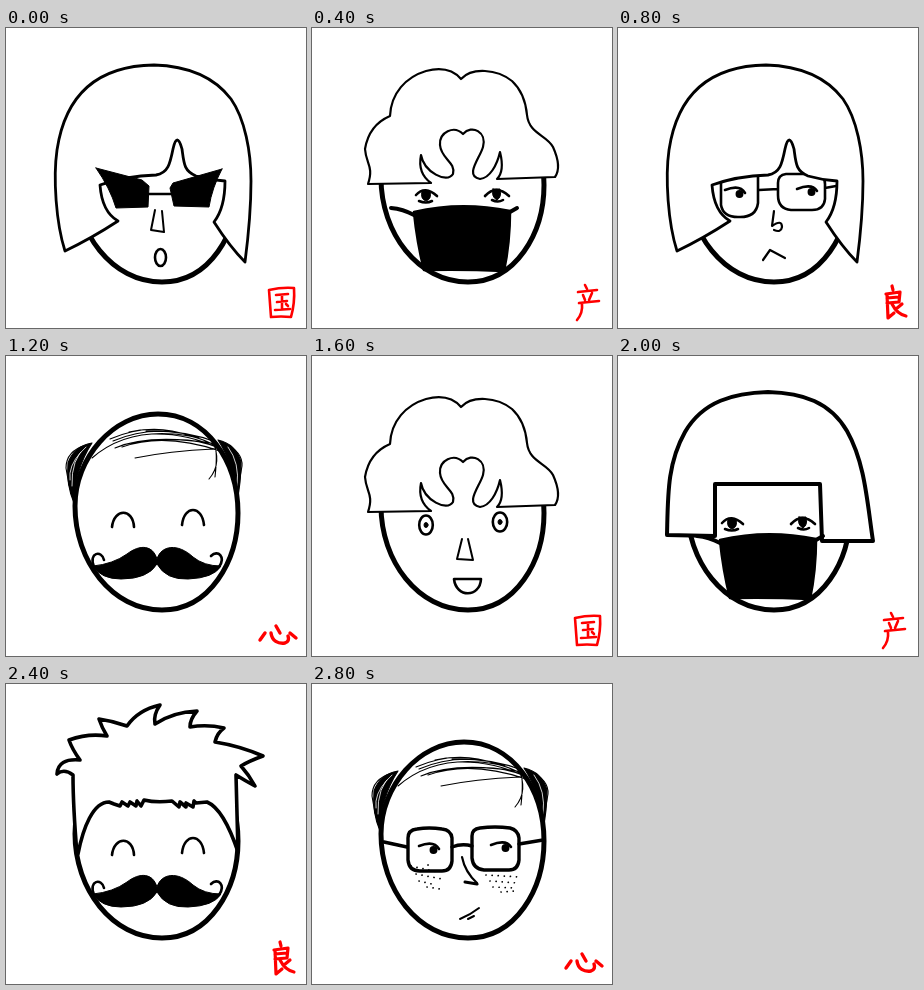
Write an HTML page that moves like this. It is 300 px wide and 300 px high and loops after 3.2 s.

```html
<!DOCTYPE html>
<html lang="zh">
<head>
<meta charset="utf-8">
<title>国产良心</title>
<style>
  html, body { margin: 0; width: 100%; height: 100%; overflow: hidden; background: #fff; }
  svg { display: block; width: 100vw; height: 100vh; }
  .ink { fill: none; stroke: #000; stroke-width: 2.6; stroke-linecap: round; stroke-linejoin: round; }
  .hair { fill: #fff; }
  .solid { fill: #000; }
  .thin { stroke-width: 1.1; }
  .bold { stroke-width: 4; }
  .dots { stroke-width: 1.7; stroke-dasharray: .1 6; }
  .seal { fill: none; stroke: #f00; stroke-width: 2.6; stroke-linecap: round; stroke-linejoin: round; }
  .pose { visibility: hidden; animation: show 3.2s step-end infinite; animation-delay: calc(var(--i) * .4s - 3.2s); }
  @keyframes show { 0% { visibility: visible; } 12.5%, 100% { visibility: hidden; } }
</style>
</head>
<body>
<svg viewBox="0 0 300 300">
  <defs>
    <path id="head" stroke-width="5" d="M152 58C107 58 69 102 69 150C69 205 106 254 156 254C204 254 232 205 232 157C232 105 200 58 152 58Z"/>

    <!-- Hair -->
    <path id="bob" class="hair" stroke-width="2.8" d="M59 223C50 195 47 150 51 122C57 82 78 38 148 37C183 38 209 50 225 71C239 91 245 124 245 153C245 184 242 211 239 234Q224 219 208 194C215 185 219 171 219 153Q204 152 190 148C178 143 178 136 176 121Q171 103 167 121C164 136 162 145 150 147Q119 148 94 157Q96 184 112 193Q86 210 59 223Z"/>
    <path id="curls" class="hair" stroke-width="2.2" d="M56 156C62 138 54 136 53 121Q57 97 78 88C79 65 94 49 114 43Q137 37 149 51C160 39 185 41 200 53Q213 65 215 87C217 106 235 107 241 119Q250 139 243 149L185 151C192 144 190 132 188 124C185 137 178 150 168 151C152 148 168 130 171 119C175 104 160 96 151 106C142 97 127 104 128 117C129 131 144 134 141 146C135 156 112 144 109 127C106 142 112 150 119 155Z"/>
    <path id="bowl" class="hair bold" d="M49 179C50 140 49 108 67 76C85 45 116 37 150 36C185 37 212 46 229 75C247 107 249 145 255 185L204 185L202 128L97 128L97 180Z"/>
    <path id="spikes" class="hair" stroke-width="3.6" d="M71 170Q67 122 67 91Q58 84 51 90Q52 74 74 76Q66 65 63 56Q82 49 101 52Q96 44 93 35Q107 37 121 42Q132 26 154 21Q147 31 149 40Q167 28 191 27Q184 35 184 43Q201 40 218 44Q211 49 209 58Q234 62 257 72Q243 77 235 82Q243 91 249 102Q238 96 230 91L232 168C224 144 213 123 201 118L190 119L188 117L187 123L180 119V123L174 118L173 123L166 117Q150 119 138 116L135 122L131 117L130 122L124 118L122 122L116 118L114 122L108 120L103 118C87 118 77 144 72 170"/>
    <g id="combover" class="thin">
      <path class="solid" d="M86 87Q68 90 62 107Q60 128 68 147Q69 113 86 87ZM212 84Q230 88 235 106Q235 127 231 145Q228 108 212 84Z"/>
      <path stroke="#fff" stroke-width=".8" d="M80 91Q65 102 66 130M75 96Q62 110 64 124M222 91Q234 107 231 130"/>
      <path d="M80 89Q60 95 60 112Q62 128 67 143M218 87Q237 96 236 110L230 144"/>
      <path d="M86 102Q118 74 168 78Q197 80 214 93M104 83Q145 65 184 80Q197 83 208 89M109 92Q144 77 211 88M116 91Q158 76 214 95M129 102Q163 95 208 93M107 85Q139 71 176 77M123 76Q154 69 193 82M150 78Q183 78 212 92M140 75Q178 74 210 86M160 84Q190 82 213 92M206 84Q217 107 203 123M208 87Q212 95 209 121"/>
    </g>

    <!-- Faces -->
    <g id="cool">
      <path class="solid" stroke-width="1" d="M90 140L136 152L143 158L142 179L110 180Q104 160 90 140ZM216 141L167 155L164 160L168 178L203 179Q206 160 216 141Z"/>
      <path d="M142 166H165"/>
      <path stroke-width="2" d="M149 182L145 202L158 204L156 183"/>
      <ellipse cx="154.500" cy="229.500" rx="5.500" ry="8.500"/>
    </g>
    <g id="glance">
      <path d="M107 162Q122 156 127 165M179 161Q194 155 199 163"/>
      <circle class="solid" cx="121.500" cy="166" r="3.200" stroke-width="1.500"/>
      <circle class="solid" cx="193.500" cy="164" r="3.200" stroke-width="1.500"/>
    </g>
    <g id="doubt">
      <path d="M103 151V177Q105 189 120 189Q138 190 140 175V149M168 146H198Q207 146 207 156V171Q206 182 194 182H173Q160 181 160 167V155Q160 147 168 146ZM141 162L160 161M207 160L218 158"/>
      <use href="#glance"/>
      <path stroke-width="2.200" d="M156 183L154 198Q164 191 164 199Q163 205 156 202M145 232L152 222L167 230"/>
    </g>
    <g id="cheer">
      <ellipse cx="114" cy="169" rx="6.800" ry="9.500"/>
      <ellipse cx="188" cy="166" rx="7.200" ry="9.500"/>
      <g class="solid" stroke-width="1"><ellipse cx="114" cy="169" rx="2" ry="2.500"/><ellipse cx="188" cy="166" rx="2" ry="2.500"/></g>
      <path stroke-width="2" d="M150 183L145 203L161 204L156 183"/>
      <path d="M142 223H169C168 242 144 242 142 223Z"/>
    </g>
    <g id="masked">
      <path d="M104 167Q113 157 125 168M107 173Q114 176 120 173M173 168Q184 156 197 168M180 172Q186 175 191 172"/>
      <path class="solid" stroke-width="1" d="M110 163H118Q120 171 114 173Q108 171 110 163ZM181 161H188Q190 169 185 172Q179 169 181 161Z"/>
      <path class="bold" d="M79 180Q91 181 102 187M198 184L205 180"/>
      <path class="solid" d="M102 184Q149 173 198 183Q198 214 192 243Q151 241 112 242Q105 214 102 184Z"/>
    </g>
    <g id="jolly">
      <path d="M106 171C108 152 127 152 128 171M176 169C178 149 196 149 198 169"/>
      <path class="solid" stroke-width="1" d="M151 203C147 189 134 188 121 198Q107 208 87 210Q95 223 115 223Q142 223 151 208Q160 224 182 223Q208 222 215 210Q198 210 187 201C172 187 155 189 151 203Z"/>
      <path d="M98 204C96 194 82 196 88 211M205 200C212 193 220 201 213 211"/>
    </g>
    <g id="worry">
      <g stroke-width="3.400">
        <path d="M105 145Q117 143 130 145Q139 146 140 154V177Q139 187 130 187H108Q97 187 96 176V154Q96 146 105 145ZM168 144Q183 142 198 144Q206 146 207 154V176Q206 186 197 186H172Q161 185 160 174V152Q160 145 168 144Z"/>
        <path d="M72 158L95 163M140 163Q150 159 160 162M207 160L231 156"/>
      </g>
      <use href="#glance"/>
      <path stroke-width="2.200" d="M150 173Q153 188 165 199"/>
      <path stroke-width="3" d="M165 200L153 198"/>
      <path stroke-width="2" d="M148 235Q158 231 167 224M156 235L162 232"/>
      <path class="dots" d="M99 182L126 188M104 190L130 195M107 197L124 201M115 203L128 205M116 181L119 183M174 191L208 193M178 197L206 199M181 203L204 204M189 208L203 207"/>
    </g>

    <!-- Seal characters -->
    <path id="guo" d="M263 262Q276 259 288 260Q289 275 285 289Q275 288 265 289ZM270 267L282 266M271 274L281 273M276 267V281M269 282L284 281M280 276L282 278"/>
    <path id="chan" d="M273 257L275 261M266 264L285 262M271 267L273 272M280 265L277 272M267 275L287 273M270 276Q271 285 265 292"/>
    <path id="liang" stroke-width="3.2" d="M274 258L275 262M268 266L282 264L281 274L269 275M269 270L281 269M269 266L270 290L276 285M274 276Q279 286 288 288M284 276L278 281"/>
    <path id="xin" stroke-width="3.4" d="M259 277L254 284M265 277C266 285 272 288 279 287Q284 285 282 280M270 270L274 277M284 277L290 282"/>
  </defs>

  <g class="pose" style="--i:0">
    <g class="ink"><use href="#head"/><use href="#bob"/><use href="#cool"/></g>
    <use class="seal" href="#guo"/>
  </g>
  <g class="pose" style="--i:1">
    <g class="ink"><use href="#head"/><use href="#curls"/><use href="#masked"/></g>
    <use class="seal" href="#chan"/>
  </g>
  <g class="pose" style="--i:2">
    <g class="ink"><use href="#head"/><use href="#doubt"/><use href="#bob"/></g>
    <use class="seal" href="#liang"/>
  </g>
  <g class="pose" style="--i:3">
    <g class="ink"><use href="#combover"/><use href="#head"/><use href="#jolly"/></g>
    <use class="seal" href="#xin"/>
  </g>
  <g class="pose" style="--i:4">
    <g class="ink"><use href="#head"/><use href="#curls"/><use href="#cheer"/></g>
    <use class="seal" href="#guo"/>
  </g>
  <g class="pose" style="--i:5">
    <g class="ink"><use href="#head"/><use href="#bowl"/><use href="#masked"/></g>
    <use class="seal" href="#chan"/>
  </g>
  <g class="pose" style="--i:6">
    <g class="ink"><use href="#head"/><use href="#spikes"/><use href="#jolly"/></g>
    <use class="seal" href="#liang"/>
  </g>
  <g class="pose" style="--i:7">
    <g class="ink"><use href="#combover"/><use href="#head"/><use href="#worry"/></g>
    <use class="seal" href="#xin"/>
  </g>
</svg>
</body>
</html>
```
